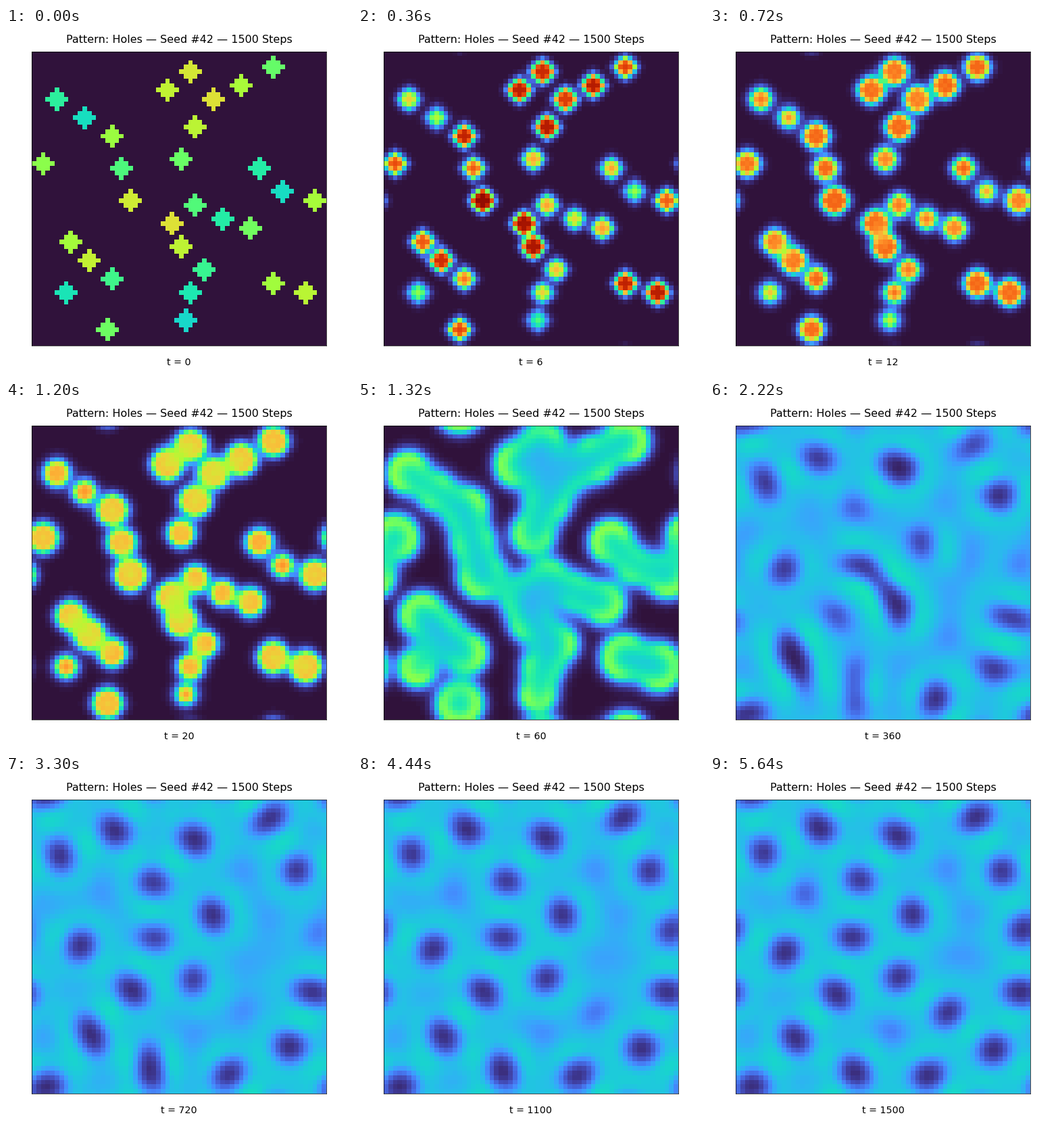
Animation of 512 by 512 pixels, one loop 8740 ms. Source, as a matplotlib script:

```python
import matplotlib.pyplot as plt
import numpy as np
from matplotlib.animation import FuncAnimation

SIZE, DPI = 512, 64
GRID = 64
STEPS = 1500
FEED, KILL = 0.039, 0.058
DIFF_U, DIFF_V = 0.16, 0.08
SPACING = 7  # cells between neighbouring seeds of a chain
TICK, HOLD_FROM, LOOP = 20, 5640, 8740  # ms
STEP_MS = 60

# Bends of the chains along which seeds are dropped
CHAINS = [
    [(52, 3), (37, 11), (32, 23)],
    [(34, 4), (29, 8)],
    [(5, 10), (17, 17), (21, 32)],
    [(49, 25), (53, 30), (61, 32)],
    [(30, 37), (35, 33), (47, 38)],
    [(8, 41), (17, 49)],
    [(32, 42), (38, 48), (32, 53), (33, 58)],
    [(52, 50), (59, 52)],
    [(2, 24)], [(7, 52)], [(16, 60)],
]


def drop_seeds(chain):
    """Evenly spaced cells along a chain, ends included."""
    x, y = np.array(chain, float).T
    along = np.append(0, np.cumsum(np.hypot(np.diff(x), np.diff(y))))
    stops = np.linspace(0, along[-1], round(along[-1] / SPACING) + 1)
    return zip(np.interp(stops, along, x).round(),
               np.interp(stops, along, y).round())


def laplacian(a):
    return (np.roll(a, 1, 0) + np.roll(a, -1, 0)
            + np.roll(a, 1, 1) + np.roll(a, -1, 1) - 4 * a)


def initial_state():
    rng = np.random.default_rng(42)
    u, v = np.ones((GRID, GRID)), np.zeros((GRID, GRID))
    rows, cols = np.mgrid[:GRID, :GRID]
    for chain in CHAINS:
        for col, row in drop_seeds(chain):
            disk = (cols - col) ** 2 + (rows - row) ** 2 <= 4
            u[disk] = rng.uniform(0.45, 0.7)
            v[disk] = rng.uniform(0.3, 0.6)
    return u, v


def simulate(times):
    """Gray-Scott reaction-diffusion; returns v at each of the given times."""
    u, v = initial_state()
    wanted, states = set(times), []
    for t in range(times[-1] + 1):
        if t in wanted:
            states.append(v.copy())
        reaction = u * v * v
        u, v = (u + DIFF_U * laplacian(u) - reaction + FEED * (1 - u),
                v + DIFF_V * laplacian(v) + reaction - (FEED + KILL) * v)
    return states


# Every step at first, then every twentieth
times = list(range(20)) + list(range(20, STEPS + 1, 20))
states = simulate(times)

plt.rcParams["font.family"] = "DejaVu Sans"
fig = plt.figure(figsize=(SIZE / DPI, SIZE / DPI), dpi=DPI, facecolor="white")
ax = fig.add_axes([38.4 / SIZE, 41.6 / SIZE, 0.85, 0.85])
ax.set(xticks=[], yticks=[])
image = ax.imshow(states[0], cmap="turbo", vmin=0, vmax=1,
                  interpolation="nearest", aspect="auto")
fig.text(0.5, 490 / SIZE, f"Pattern: Holes — Seed #42 — {STEPS} Steps",
         fontsize=18, ha="center", va="baseline")
caption = fig.text(0.5, 13 / SIZE, "t = 0", fontsize=16,
                   ha="center", va="baseline")


def update(frame):
    index = min(frame * TICK, HOLD_FROM) // STEP_MS
    image.set_data(states[index])
    caption.set_text(f"t = {times[index]}")
    return image, caption


anim = FuncAnimation(fig, update, frames=LOOP // TICK, interval=TICK,
                     repeat=True, repeat_delay=0, cache_frame_data=False)
plt.show()
```
